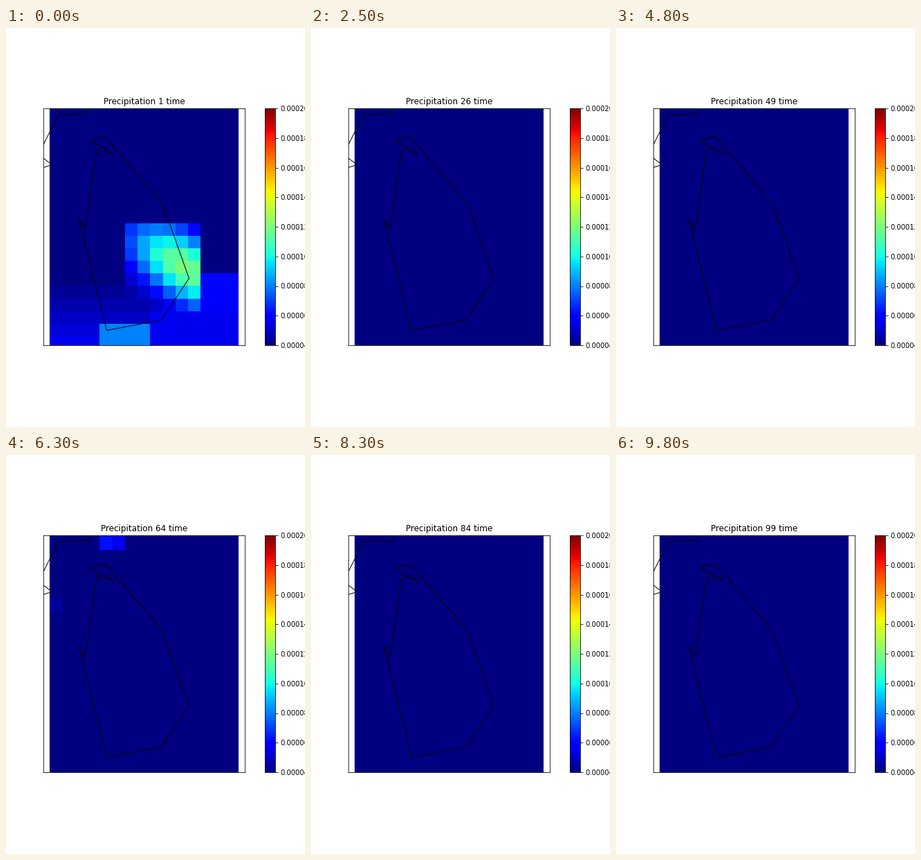
Animation of 432x576 px, one loop 9.9 s. Source, as a matplotlib script:

```python
import numpy as np
import matplotlib.pyplot as plt
from matplotlib.animation import FuncAnimation
from matplotlib.cm import ScalarMappable
from matplotlib.colors import Normalize

W, H, DPI = 432, 576, 72
FRAMES, INTERVAL = 99, 100
ROWS, COLS = 19, 15
CELL_W, CELL_H = 18.22, 18.12
LEFT, RIGHT, TOP, BOTTOM = 54, 345.4, 116, 458
VMIN, VMAX = 0.00004, 0.0002

row, col = np.mgrid[:ROWS, :COLS]


def box(x0, x1):
    """Axes rectangle between two pixel columns, at the shared height."""
    return [x0 / W, 1 - BOTTOM / H, (x1 - x0) / W, (BOTTOM - TOP) / H]


def patch(value, top=0, left=0, bottom=ROWS, right=COLS):
    """Value inside a block of cells, zero elsewhere."""
    inside = (row >= top) & (row < bottom) & (col >= left) & (col < right)
    return np.where(inside, value, 0)


def core(peak, mid_row, mid_col, slant):
    """Rain core whose centre slides east from row to row."""
    centre = mid_col + slant * (row - mid_row)
    return peak * np.exp(-((row - mid_row)**2 + (col - centre)**2) / 3.6**2)


def layers(*parts):
    return np.maximum.reduce(parts)


storm_start = layers(
    patch(core(0.5, 12, 10.2, 0.7), 9, 6, 16, 12),
    patch(0.02 * (row - 13), 14),
    patch(0.13 - 0.01 * (row - 13), 13, 12),
    patch(0.10, 16, 8),
    patch(0.25, 17, 4, right=8),
)
storm_peak = layers(
    patch(core(0.58, 11.6, 10.2, 0.8), 9, 8, 17, 12),
    patch(0.30 - 0.03 * (col - 4), 13, 4, 17, 12),
    patch(np.minimum(0.13, 0.035 * (row - 9)), 10, right=4),
    patch(0.02, 8, 7, 9),
    patch(0.04, 13, 12),
    patch(0.04, 17, 8),
)
shower = layers(
    patch(0.14, 0, 4, 1, 5),
    patch(0.10, 0, 5, 1, 6),
    patch(0.03, 5, 0, 6, 1),
)


def rain(i):
    """Storm grows for ten steps, fades for ten, then one short shower."""
    grow = np.clip(i / 10, 0, 1)
    fade = np.clip((20 - i) / 10, 0, 1)
    blip = max(0, 1 - abs(i - 63) / 4)
    storm = (1 - grow) * storm_start + grow * storm_peak
    return VMIN + (VMAX - VMIN) * (fade * storm + blip * shower)


fig = plt.figure(figsize=(W / DPI, H / DPI), dpi=DPI, facecolor="white")
ax = fig.add_axes(box(LEFT, RIGHT))
ax.set(xlim=(LEFT, RIGHT), ylim=(BOTTOM, TOP), xticks=[], yticks=[])

norm = Normalize(VMIN, VMAX)
x_edges = 62.6 + CELL_W * np.arange(COLS + 1)
y_edges = 118.7 + CELL_H * np.arange(ROWS + 1)
y_edges[0] = TOP - 1
mesh = ax.pcolormesh(x_edges, y_edges, rain(0), cmap="jet", norm=norm)

coasts = [
    [(143, 156), (164, 181), (226, 254), (264, 361), (224, 421), (145, 436),
     (105, 276), (114, 291), (131, 174), (155, 181), (120, 162), (143, 156)],
    [(53, 169), (75, 125), (118, 123), (120, 115)],
    [(53, 187), (66, 197), (53, 201)],
]
for coast in coasts:
    x, y = np.transpose(coast) + 0.5  # pixel centres
    ax.plot(x, y, color="black", lw=1)

cax = fig.add_axes(box(374.4, 389.4))
bar = fig.colorbar(ScalarMappable(norm, "jet"), cax=cax, format="%.5f")
bar.set_ticks(np.linspace(VMIN, VMAX, 9))

title = ax.set_title("")


def update(i):
    mesh.set_array(rain(i))
    title.set_text(f"Precipitation {i + 1} time")
    return mesh, title


anim = FuncAnimation(fig, update, frames=FRAMES, interval=INTERVAL,
                     repeat=True, repeat_delay=0, blit=False)
plt.show()
```
